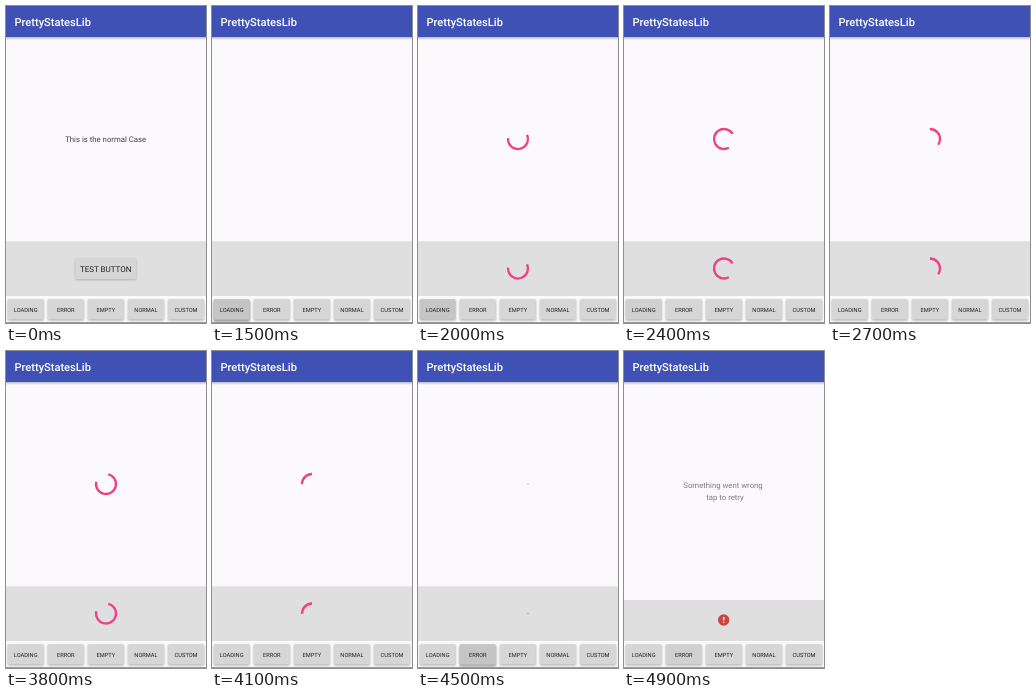
An HTML page that plays this animation: 200x317 px, repeating every 5 s.

```html
<!DOCTYPE html>
<html lang="en">
<head>
<meta charset="utf-8">
<title>PrettyStatesLib</title>
<style>
  html, body { margin: 0; height: 100%; overflow: hidden; background: #fbf9fc; }
  svg { display: block; width: 100vw; height: 100vh; }
  text { font-family: Roboto, Arial, sans-serif; text-anchor: middle; text-rendering: geometricPrecision; }
  .msg { font-size: 7.78px; }
  .spin { fill: none; stroke: #ee4082; stroke-width: 2.3; }
</style>
</head>
<body>
<svg viewBox="0 0 200 317">
  <defs>
    <linearGradient id="fade" x2="0" y2="1">
      <stop stop-color="#b9b9c4"/>
      <stop offset="1" stop-color="#fbf9fc"/>
    </linearGradient>
    <filter id="soft" x="-20%" y="-30%" width="140%" height="170%"><feGaussianBlur stdDeviation=".8"/></filter>
  </defs>
  <rect width="200" height="317" fill="#fbf9fc"/>
  <rect y="31" width="200" height="3" fill="url(#fade)"/>
  <rect width="200" height="31" fill="#3f51b5"/>
  <text x="8.4" y="20" font-size="11.1" font-weight="500" fill="#fff" style="text-anchor:start">PrettyStatesLib</text>
  <rect id="panel" width="200" fill="#e0dfe0"/>
  <rect y="290" width="200" height="27" fill="#fafafa"/>
  <rect y="316" width="200" height="1" fill="#9a9a9a"/>

  <g id="normal">
    <text class="msg" x="99.7" y="136" fill="#444">This is the normal Case</text>
  </g>
  <g id="loading">
    <circle class="spin" r="10" pathLength="360"/>
    <circle class="spin" r="10" pathLength="360"/>
  </g>
  <g id="error">
    <g fill="#7b7b7b">
      <text class="msg" x="99" y="137.4">Something went wrong</text>
      <text class="msg" x="101" y="148.7">tap to retry</text>
    </g>
    <circle cx="99.7" cy="269" r="5.7" fill="#c94442"/>
    <path d="M99.7 266v3.6m0 1.1v1.3" stroke="#fff" stroke-width="1.3"/>
  </g>
  <g id="bar"></g>
</svg>
<script>
const LOOP = 5000, STEP = 100;
const NS = 'http://www.w3.org/2000/svg';
const byId = id => document.getElementById(id);
const clamp = v => Math.min(1, Math.max(0, v));
const ramp = (t, from, to) => clamp((t - from) / (to - from));

function add(parent, tag, attrs, label = '') {
  const el = document.createElementNS(NS, tag);
  for (const name in attrs) el.setAttribute(name, attrs[name]);
  el.textContent = label;
  return parent.appendChild(el);
}

function button(parent, x, y, width, height, label, size) {
  const box = { x, width, height, rx: 1.2 };
  const lift = add(parent, 'rect', { ...box, y: y + 2, fill: '#777', filter: 'url(#soft)', opacity: 0 });
  add(parent, 'rect', { ...box, y: y + .8, fill: '#aaa', filter: 'url(#soft)' });
  add(parent, 'rect', { ...box, y, fill: '#d6d6d7' });
  const tint = add(parent, 'rect', { ...box, y, fill: '#000', opacity: 0 });
  add(parent, 'text', { x: x + width / 2, y: y + height / 2 + size * .36, 'font-size': size, fill: '#222' }, label);
  return (dark, raised) => {
    tint.setAttribute('opacity', dark * .08);
    lift.setAttribute('opacity', raised * .8);
  };
}

button(byId('normal'), 69.3, 252.5, 60.8, 20.5, 'TEST BUTTON', 8);
const [pressLoading, pressError] = ['LOADING', 'ERROR', 'EMPTY', 'NORMAL', 'CUSTOM']
  .map((label, i) => button(byId('bar'), 1.8 + 40.1 * i, 293.3, 35.8, 20.3, label, 5.7));

// Fast-out, slow-in curve: cubic-bezier(.2, 0, .1, 1)
function ease(x) {
  let lo = 0, hi = 1;
  for (let i = 0; i < 20; i++) {
    const u = (lo + hi) / 2, v = 1 - u;
    if (.6 * v * v * u + .3 * v * u * u + u ** 3 < x) lo = u; else hi = u;
  }
  return lo * lo * (3 - 2 * lo);
}

// Time, sweep cycle, base rotation in degrees
const pace = [
  [1400, -.24, -67], [2000, .21, 65], [2700, .627, 215],
  [3400, 1.22, 360], [4100, 1.663, 540], [4700, 2.1, 675]
];

function arc(t) {
  let i = 1;
  while (i < pace.length - 1 && t > pace[i][0]) i++;
  const a = pace[i - 1], b = pace[i], k = ramp(t, a[0], b[0]);
  const cycle = a[1] + (b[1] - a[1]) * k;
  const turn = a[2] + (b[2] - a[2]) * k + 270 * Math.floor(cycle);
  const part = cycle - Math.floor(cycle);
  const head = 270 * ease(clamp(part * 2));
  const tail = 270 * ease(clamp(part * 2 - 1));
  return { start: turn + tail, length: Math.max(4, head - tail) };
}

const rings = document.querySelectorAll('.spin');
const show = (id, alpha) => byId(id).setAttribute('opacity', alpha);

function draw(t) {
  const failed = t >= 4600;
  const top = failed ? 249 : 235.3;
  byId('panel').setAttribute('y', top);
  byId('panel').setAttribute('height', 290 - top);

  show('normal', t < 1500 ? 1 : 0);
  show('loading', failed ? 0 : ramp(t, 1500, 1800) * (1 - ramp(t, 4400, 4600)));
  show('error', ramp(t, 4600, 4900));

  const { start, length } = arc(t);
  rings.forEach((ring, i) => {
    ring.setAttribute('transform', `translate(100 ${i ? 262.5 : 133}) rotate(${start - 90})`);
    ring.setAttribute('stroke-dasharray', `${length} 360`);
  });

  pressLoading(t < 1500 ? 0 : 1 - ramp(t, 2000, 2600), t < 1500 ? 0 : 1 - ramp(t, 1500, 2000));
  pressError(t < 4300 ? 0 : 1 - ramp(t, 4500, 5100), t < 4300 ? 0 : 1 - ramp(t, 4400, 4900));
}

const begin = performance.now();
function tick() {
  const t = (performance.now() - begin) % LOOP;
  draw(Math.floor(t / STEP) * STEP);
  requestAnimationFrame(tick);
}
tick();
</script>
</body>
</html>
```
